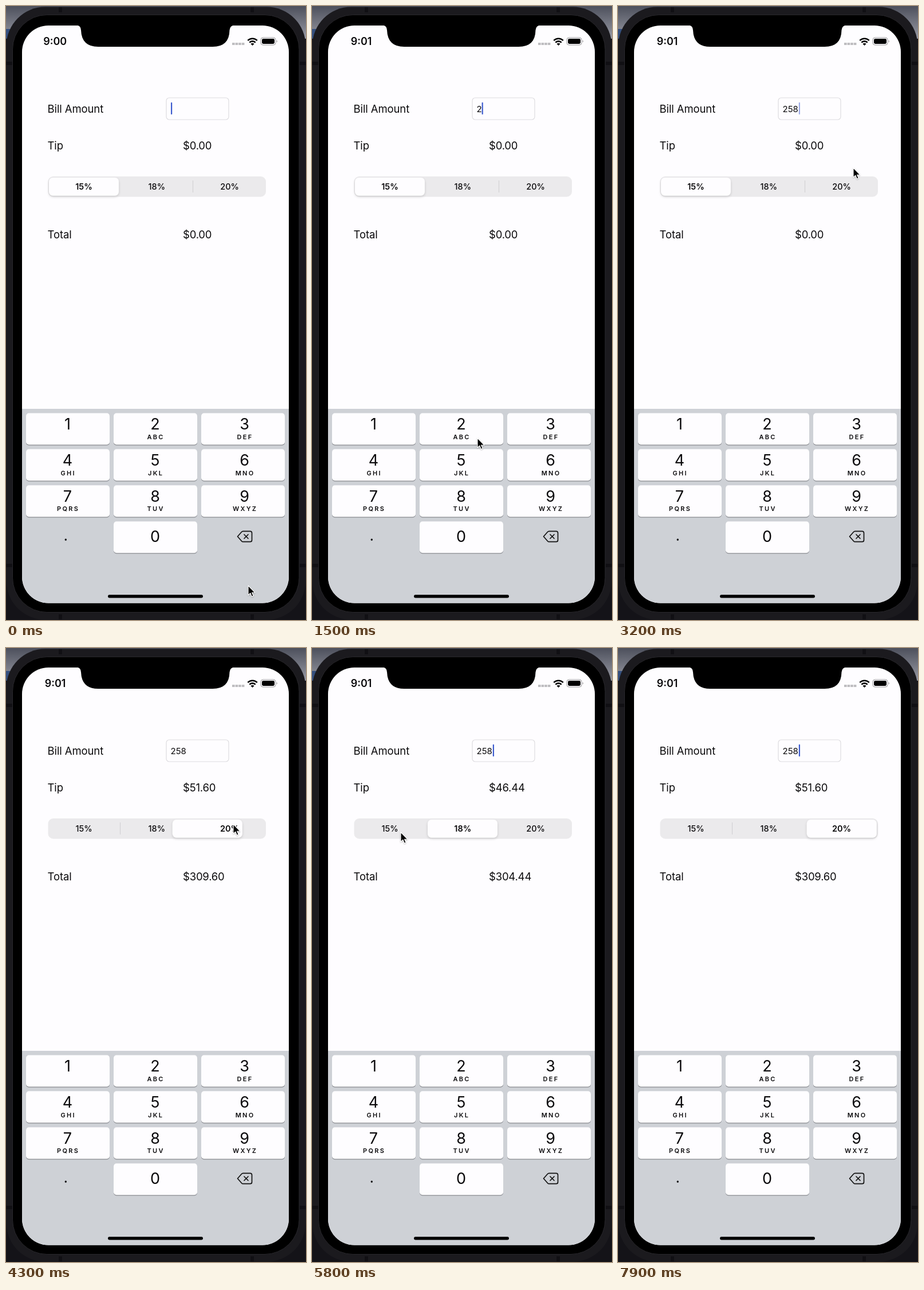
An HTML page that plays this animation: 524x1070 px, repeating every 8 s.

```html
<!DOCTYPE html>
<html lang="en">
<head>
<meta charset="utf-8">
<title>Tip calculator</title>
<style>
  html, body { margin: 0; width: 100%; height: 100%; overflow: hidden; background: #141318; }
  svg { display: block; width: 100%; height: 100%; font-family: Inter, Roboto, sans-serif; fill: #0b0a0c; }
  .label { font-size: 18.5px; letter-spacing: -.1px; }
  .value { font-size: 18.5px; letter-spacing: -.2px; }
  .entry { font-size: 15px; }
  .clock { font-size: 18px; font-weight: 600; text-anchor: middle; }
  .seg { font-size: 14.5px; font-weight: 500; text-anchor: middle; }
  .digit { font-size: 27px; text-anchor: middle; }
  .letters { font-size: 11px; font-weight: 600; letter-spacing: 2.3px; text-anchor: middle; }
</style>
</head>
<body>
<svg viewBox="0 0 524 1070">
  <defs>
    <linearGradient id="sky" x2="0" y2="1">
      <stop offset="0" stop-color="#4d505c"/>
      <stop offset="1" stop-color="#989aa4"/>
    </linearGradient>
    <filter id="lift" x="-10%" y="-20%" width="120%" height="150%">
      <feDropShadow dx="0" dy="2" stdDeviation="2" flood-opacity=".16"/>
    </filter>
    <filter id="soft" x="-50%" y="-50%" width="200%" height="200%">
      <feDropShadow dx="0" dy="1" stdDeviation="1" flood-opacity=".3"/>
    </filter>
    <clipPath id="screen"><rect x="28" y="34" width="466" height="1006.500" rx="46"/></clipPath>
  </defs>

  <!-- desktop and phone body -->
  <rect width="524" height="1070" fill="#141318"/>
  <rect width="524" height="57" fill="url(#sky)"/>
  <rect y="40" width="20" height="17" fill="#35507f"/>
  <rect x=".5" y="1.500" width="523" height="1068" rx="68" fill="#1b1a1e"/>
  <path d="M92 2h6v9h-6zM427 2h6v9h-6zM92 1060h6v9h-6zM427 1060h6v9h-6zM0 97h11v6H0zM513 97h11v6h-11zM0 972h11v6H0zM513 972h11v6h-11z" fill="#111014"/>
  <rect x="11.500" y="15.500" width="500.500" height="1041" rx="60" fill="#000" stroke="#29282c"/>

  <g clip-path="url(#screen)">
    <rect x="28" y="34" width="466" height="1007" fill="#fefdff"/>
    <rect x="28" y="702" width="466" height="339" fill="#ced1d6"/>
  </g>
  <path d="M122 33Q131 34 131 42Q132 71 161 71H361Q390 71 390.500 42Q391 34 400 33Z" fill="#000"/>

  <!-- status bar -->
  <text id="clock" class="clock" y="68"/>
  <path d="M395 66h21.500" stroke="#bebdc0" stroke-width="4" stroke-dasharray="4.600 1"/>
  <g fill="none" stroke="#000" stroke-width="2.600">
    <path d="M422.300 60.200a11.500 11.500 0 0 1 16.400 0M425.300 63.600a7.300 7.300 0 0 1 10.400 0"/>
  </g>
  <path d="M430.500 69l-3-3.100a4.200 4.200 0 0 1 6 0z" fill="#000"/>
  <rect x="445" y="55" width="26" height="13" rx="4" fill="none" stroke="#98979a"/>
  <rect x="447" y="57" width="22" height="9" rx="2.400" fill="#000"/>
  <path d="M472.700 59.500q2.400 2 0 4z" fill="#98979a"/>

  <!-- form -->
  <text class="label" x="72.500" y="186.300">Bill Amount</text>
  <text class="label" x="72.500" y="250.300">Tip</text>
  <text class="label" x="72.500" y="405.300">Total</text>
  <rect x="280" y="160" width="109" height="38" rx="5" fill="#fefdff" stroke="#dddce0" stroke-width="1.200"/>
  <text id="entry" class="entry" x="287.500" y="184.500"/>
  <rect id="caret" y="168" width="2.200" height="21" rx=".8" fill="#3d5cce"/>
  <text id="tip" class="value" x="309" y="250.300"/>
  <text id="total" class="value" x="309" y="405.300"/>

  <!-- segmented control -->
  <rect x="73.500" y="297" width="380.500" height="35.500" rx="9" fill="#ebeaec"/>
  <rect id="div0" x="199" y="304" width="1" height="21" fill="#cfced1"/>
  <rect id="div1" x="326" y="304" width="1" height="21" fill="#cfced1"/>
  <rect id="pill" y="299" width="122" height="31.500" rx="7" fill="#fefdff" filter="url(#lift)"/>
  <g id="segs"></g>

  <!-- keypad -->
  <g id="keys"></g>
  <circle cx="104.300" cy="930" r="1.700"/>
  <g fill="none" stroke="#111" stroke-width="1.700" stroke-linejoin="round" stroke-linecap="round">
    <path d="M404.500 924.500l7-8q1-1.200 2.500-1.200h12.500q3 0 3 3v12.400q0 3-3 3H414q-1.500 0-2.500-1.200z"/>
    <path d="M416 921l7 7m0-7l-7 7"/>
  </g>
  <rect x="178" y="1026" width="166" height="5.500" rx="2.750" fill="#000"/>

  <path id="pointer" d="M0 0V16.700L3.800 13.200L6.400 19.200L9.100 18L6.600 12.200H11.800Z" fill="#000" stroke="#fff" stroke-width="1.100" stroke-linejoin="round" filter="url(#soft)"/>
</svg>
<script>
const LOOP = 8000, STEP = 100, SLIDE = 430;
const $ = id => document.getElementById(id);
const set = (id, name, value) => $(id).setAttribute(name, value);
const lerp = (a, b, p) => a + (b - a) * p;
const clamp = p => Math.min(1, Math.max(0, p));
const smooth = p => p * p * (3 - 2 * p);

const rates = [15, 18, 20];
const segX = [75, 202, 329.8];

// time, chosen segment
const picks = [[4100, 2], [5100, 1], [6100, 0], [7000, 1], [7400, 2]];

// time, typed digit, caret position afterwards
const strokes = [[1400, '2', 296.6], [1900, '5', 306.2], [2500, '8', 315.8]];

// time, x, y of the pointer tip
const path = [
  [0, 423, 1010], [200, 418, 995], [900, 289, 745], [1200, 289, 745], [1500, 289, 753],
  [1800, 283, 800], [1900, 283, 802], [2100, 284, 832], [2400, 284, 850], [2500, 284, 850],
  [3000, 445, 300], [3200, 411, 282], [3900, 397, 307], [4500, 397, 307], [5000, 268, 311],
  [5300, 268, 312], [5800, 155, 321], [6000, 141, 312], [6200, 141, 312], [6600, 260, 333],
  [6900, 265, 312], [7100, 265, 312], [7400, 405, 308], [7600, 417, 312], [7800, 437, 645]
];

const keyX = [35, 188, 341], keyY = [709.5, 772.3, 835.2, 898.2], textX = [107.5, 260.5, 416.5];
const letters = ['', 'ABC', 'DEF', 'GHI', 'JKL', 'MNO', 'PQRS', 'TUV', 'WXYZ'];

function key(digit, col, row, sub) {
  const x = keyX[col], y = keyY[row], cx = textX[col];
  const base = y + (row < 3 ? 28.7 : 35.7);
  return `<rect x="${x}" y="${y + 1.2}" width="146" height="55" rx="5" fill="#898b90"/>
    <rect id="key${digit}" x="${x}" y="${y}" width="146" height="55" rx="5"/>
    <text class="digit" x="${cx}" y="${base}">${digit}</text>
    <text class="letters" x="${cx + 1.1}" y="${y + 45.2}">${sub}</text>`;
}

$('keys').innerHTML = letters.map((sub, i) => key(i + 1, i % 3, i / 3 | 0, sub)).join('') + key(0, 1, 3, '');
for (let d = 0; d < 10; d++) set('key' + d, 'fill', '#fefdff');
$('segs').innerHTML = rates.map((r, i) =>
  `<text id="seg${i}" class="seg" x="${136 + i * 127.3}" y="319.800">${r}%</text>`).join('');

function pointerAt(t) {
  const i = path.findIndex(k => k[0] > t);
  if (i < 0) return path[path.length - 1].slice(1);
  const [t0, x0, y0] = path[i - 1], [t1, x1, y1] = path[i];
  const p = smooth((t - t0) / (t1 - t0));
  return [lerp(x0, x1, p), lerp(y0, y1, p)];
}

function caretAlpha(t) {
  if (t >= 1000 && t < 3100) return 1;
  const u = t % 1000;
  return u < 400 ? 1 - clamp((u - 100) / 200) : clamp((u - 400) / 150);
}

function drawEntry(t) {
  const typed = strokes.filter(s => s[0] <= t);
  $('entry').textContent = typed.map(s => s[1]).join('');
  set('caret', 'x', typed.length ? typed[typed.length - 1][2] : 288);
  set('caret', 'opacity', caretAlpha(t));
  for (const [at, digit] of strokes) {
    const down = t >= at - 100 && t <= at;
    set('key' + digit, 'fill', down ? '#b3b8c1' : '#fefdff');
  }
}

function drawTip(t) {
  let sel = 0, x = segX[0];
  picks.forEach(([at, to], i) => {
    if (t < at) return;
    const until = i + 1 < picks.length ? Math.min(t, picks[i + 1][0]) : t;
    x = lerp(x, segX[to], 1 - (1 - clamp((until - at) / SLIDE)) ** 3);
    sel = to;
  });
  const bill = t < picks[0][0] ? 0 : 258;
  const tip = bill * rates[sel] / 100;
  $('tip').textContent = '$' + tip.toFixed(2);
  $('total').textContent = '$' + (bill + tip).toFixed(2);
  set('pill', 'x', x);
  set('div0', 'opacity', sel === 2 ? 1 : 0);
  set('div1', 'opacity', sel === 0 ? 1 : 0);
  rates.forEach((_, i) => set('seg' + i, 'font-weight', 500));
  rates.forEach((_, i) => { $('seg' + i).style.fontWeight = i === sel ? 600 : 500; });
}

function draw(time) {
  const t = Math.floor(time % LOOP / STEP) * STEP;
  const late = t >= 500;
  $('clock').textContent = late ? '9:01' : '9:00';
  set('clock', 'x', late ? 86 : 85.7);
  drawEntry(t);
  drawTip(t);
  const [x, y] = pointerAt(t);
  set('pointer', 'transform', `translate(${x} ${y})`);
  set('pointer', 'visibility', t > 7800 ? 'hidden' : 'visible');
}

const start = performance.now();
function tick() {
  draw(performance.now() - start);
  requestAnimationFrame(tick);
}
tick();
</script>
</body>
</html>
```
